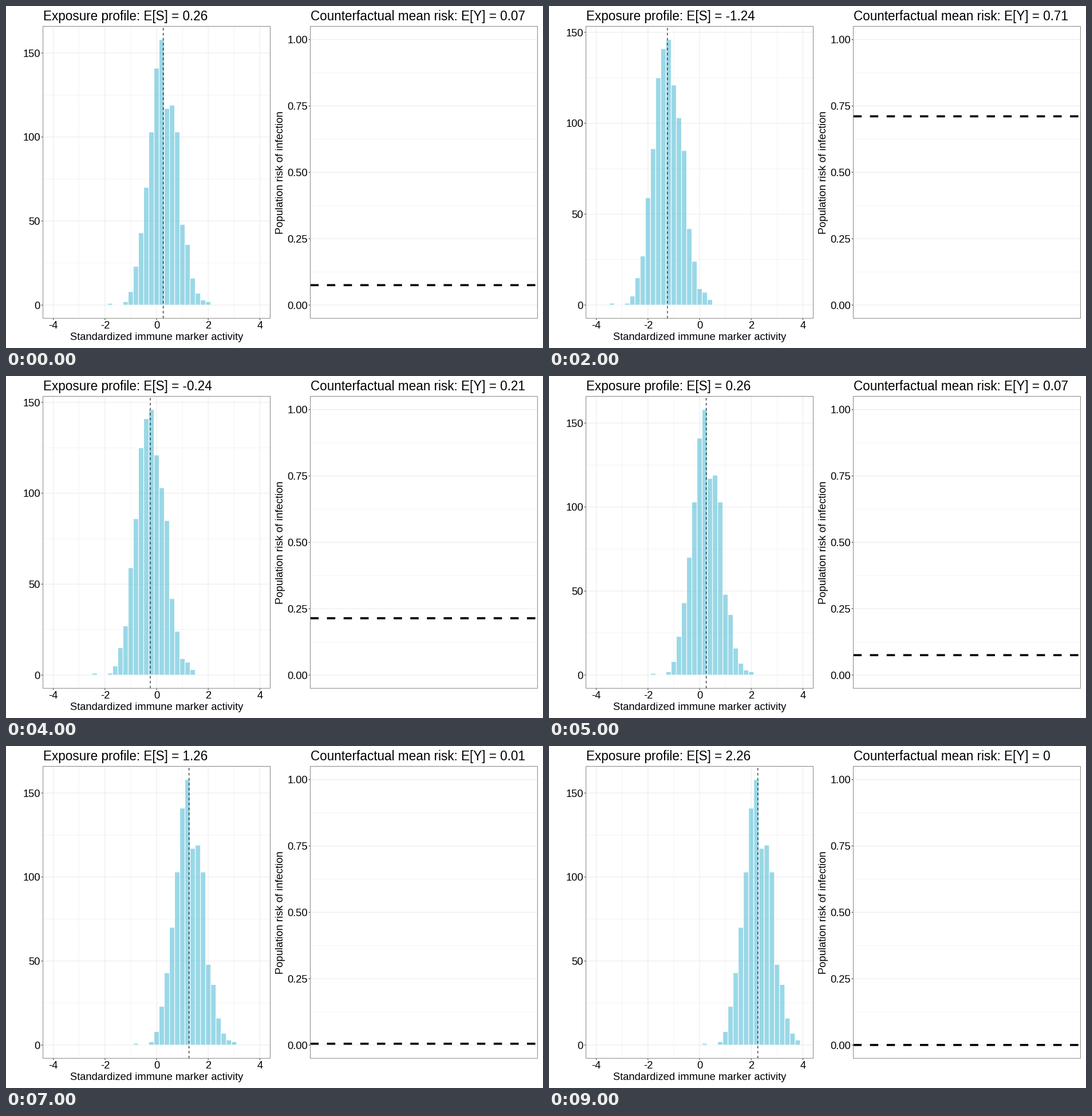
Recreate the animation shown at these times as a matplotlib script. Size 938 px wide and 597 px high, loop 10000 ms.

```python
import matplotlib.pyplot as plt
from matplotlib.animation import FuncAnimation
from matplotlib.patches import Rectangle

W, H, DPI = 938, 597, 64
PT = 72 / DPI                      # points per pixel
TOP, BOTTOM = 35.5, 545.2
LEFT = (64.6, 461.5)
RIGHT = (531.5, 928.4)
GRID, EDGE, TICK = "#ebebeb", "#858585", "#333333"

MEAN = 0.256
SHIFTS = [0] + [k / 2 for k in range(-4, 5)]
RISKS = [0.075, 0.886, 0.711, 0.453, 0.214, 0.075, 0.021, 0.005, 0.001, 0.0003]

# Bin counts of the 1000 samples; half-unit shifts fall differently on the bins.
WHOLE = (-1.8, [1, 0, 0, 2, 8, 23, 43, 70, 103, 141, 158, 117, 119, 103,
                48, 36, 16, 7, 3, 2])
HALF = (-1.9, [1, 0, 0, 1, 5, 15, 27, 59, 86, 125, 141, 146, 121, 103,
               85, 42, 24, 9, 7, 3])
BIN = 0.2

plt.rcParams["font.family"] = "Liberation Sans"
fig = plt.figure(figsize=(W / DPI, H / DPI), dpi=DPI, facecolor="white")
ax = fig.add_axes([0, 0, 1, 1])


def line(x, y, color, width, **kw):
    ax.plot(x, y, color=color, lw=width * PT, snap=False,
            solid_capstyle="butt", **kw)


def text(x, y, s, size=18.4, ha="left", **kw):
    ax.text(x, y, s, fontsize=size * PT, ha=ha, va="baseline", color="black", **kw)


def box(x, y, w, h, width, **kw):
    ax.add_patch(Rectangle((x, y), w, h, lw=width * PT, joinstyle="miter",
                           snap=False, **kw))


def scale(lo, hi, start, end):
    """Map lo..hi onto start..end with 5% padding on both sides."""
    pad = 0.05 * (hi - lo)
    step = (end - start) / (hi - lo + 2 * pad)
    return lambda v: start + (v - lo + pad) * step


def grid_rows(panel, ys, major, minor, fmt):
    for v in minor:
        line(panel, [ys(v)] * 2, GRID, 0.55)
    for v in major:
        y = ys(v)
        line(panel, [y, y], GRID, 1.07)
        line([panel[0] - 2.8, panel[0]], [y, y], TICK, 1.07)
        text(panel[0] - 4.7, y + 6.6, fmt.format(v), ha="right")


def border(panel):
    box(panel[0], TOP, panel[1] - panel[0], BOTTOM - TOP, 1,
        fill=False, ec=EDGE, zorder=5)


def histogram(shift):
    first, counts = HALF if shift % 1 else WHOLE
    xs = scale(-4, 4, *LEFT)
    ys = scale(0, max(counts), BOTTOM, TOP)

    for v in range(-3, 4, 2):
        line([xs(v)] * 2, [BOTTOM, TOP], GRID, 0.55)
    for v in range(-4, 5, 2):
        x = xs(v)
        line([x, x], [BOTTOM, TOP], GRID, 1.07)
        line([x, x], [BOTTOM, BOTTOM + 2.8], TICK, 1.07)
        text(x, 563, str(v), ha="center")
    grid_rows(LEFT, ys, range(0, 151, 50), range(25, 126, 50), "{}")

    for k, n in enumerate(counts):
        x = first + shift + k * BIN
        if x + BIN / 2 < 4.01:
            box(xs(x - BIN / 2), ys(0), xs(BIN) - xs(0), ys(n) - ys(0), 1.07,
                fc=(0.302, 0.733, 0.835, 0.57), ec="white", zorder=3)

    x = xs(MEAN + shift)
    line([x, x], [BOTTOM, TOP], "black", 1.083, ls=(0, (4, 4)), zorder=4)
    border(LEFT)
    text(LEFT[0], 25, f"Exposure profile: E[S] = {MEAN + shift:.2f}", 22.5)
    text(sum(LEFT) / 2, 583, "Standardized immune marker activity", ha="center")


def risk_panel(risk):
    ys = scale(0, 1, BOTTOM, TOP)
    grid_rows(RIGHT, ys, [k / 4 for k in range(5)],
              [k / 8 for k in range(1, 8, 2)], "{:.2f}")
    line(RIGHT, [ys(risk)] * 2, "black", 3.64, ls=(0, (4, 4)), zorder=4)
    border(RIGHT)
    text(RIGHT[0], 25, f"Counterfactual mean risk: E[Y] = {round(risk, 2):g}", 22.5)
    text(484, (TOP + BOTTOM) / 2, "Population risk of infection", ha="center",
         rotation=90, rotation_mode="anchor")


def draw(i):
    ax.clear()
    ax.set(xlim=(0, W), ylim=(H, 0))
    ax.axis("off")
    histogram(SHIFTS[i])
    risk_panel(RISKS[i])
    return []


anim = FuncAnimation(fig, draw, frames=len(SHIFTS), interval=1000,
                     repeat=True, repeat_delay=0, blit=False)
plt.show()
```
